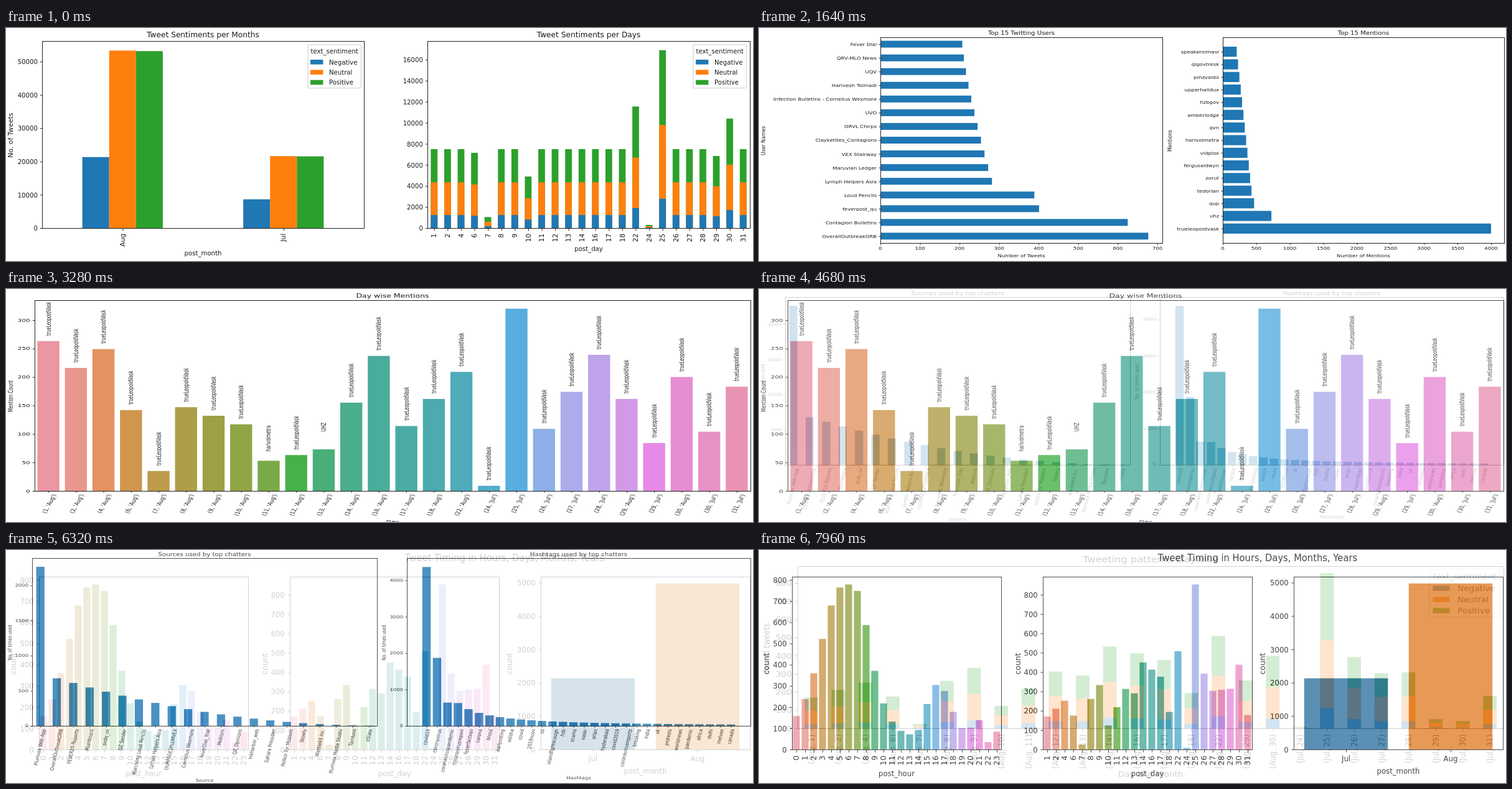
An HTML page that plays this animation: 1200 by 375 pixels, repeating every 8000 ms.

```html
<!DOCTYPE html>
<html lang="en">
<head>
<meta charset="utf-8">
<title>Chart slideshow</title>
<style>
html, body { margin: 0; width: 100%; height: 100%; overflow: hidden; background: #fff; }
svg { position: absolute; left: 0; top: 0; width: 1200px; height: 375px; background: #fff; }
text { font-family: 'DejaVu Sans', sans-serif; fill: #1c1c1c; white-space: pre; }
.line { fill: none; stroke: #222; stroke-width: 1; }

/* Each slide fades in over the one before, in five steps of 60 ms */
svg + svg { animation: 8s step-end infinite; }
#users { animation-name: users; }
#days { animation-name: days; }
#sources { animation-name: sources; }
#timing { animation-name: timing; }
#pattern { animation-name: pattern; }
@keyframes users { 0% { opacity: 0 } 17.5% { opacity: .2; animation-timing-function: steps(5, jump-none) } 21.25%, to { opacity: 1 } }
@keyframes days { 0% { opacity: 0 } 38% { opacity: .2; animation-timing-function: steps(5, jump-none) } 41.75%, to { opacity: 1 } }
@keyframes sources { 0% { opacity: 0 } 58.5% { opacity: .2; animation-timing-function: steps(5, jump-none) } 62.25%, to { opacity: 1 } }
@keyframes timing { 0% { opacity: 0 } 79% { opacity: .2; animation-timing-function: steps(5, jump-none) } 82.75%, to { opacity: 1 } }
@keyframes pattern { 0% { opacity: 0 } 99.5%, to { opacity: .2 } }
</style>
</head>
<body>
<svg id="sentiment" viewBox="0 0 1200 375"></svg>
<svg id="users" viewBox="0 0 1200 375"></svg>
<svg id="days" viewBox="0 0 1200 375"></svg>
<svg id="sources" viewBox="0 0 1200 375"></svg>
<svg id="timing" viewBox="0 0 1200 375"></svg>
<svg id="pattern" viewBox="0 0 1200 375"></svg>
<script>
const BLUE = '#1f77b4', ORANGE = '#ff7f0e', GREEN = '#2ca02c';
const STACK = [BLUE, ORANGE, GREEN];
let out, sx, sy;

// --- Data ---

const series = (n, f) => Array.from({ length: n }, (_, i) => f(i));

// Fills the holes of a list by straight lines between its neighbours
function fill(knots) {
  return series(knots.length, i => {
    let a = i, b = i;
    while (!(a in knots)) a--;
    while (!(b in knots)) b++;
    return a === b ? knots[i] : knots[a] + (knots[b] - knots[a]) * (i - a) / (b - a);
  });
}

// Lopsided peak with its own width on each side
const hill = (x, peak, height, left, right) =>
  height / (1 + (Math.abs(x - peak) / (x < peak ? left : right)) ** 3);

const skipped = [3, 5, 15, 19, 20, 21, 23];
const DAYS = series(31, i => i + 1).filter(d => !skipped.includes(d));

// All days have the same total but for a few
const unusual = { 6: 7150, 7: 1050, 10: 4900, 22: 11550, 24: 300, 25: 16900, 29: 6850, 30: 10400 };
const totals = DAYS.map(d => unusual[d] ?? 7500);

const tweets = fill([170, , 252, 175, 24, 261, 333, 124, , 313, 290, 450, , 376, 194, 508,
  8, 853, 392, 303, , 314, 438, 178]);

// Days 29 and 30 occur in both months; earlier ones are August, later ones July
const inAugust = d => ({ 29: .84, 30: .91 })[d] ?? +(d < 24);
const byMonth = (month, share) =>
  DAYS.map((day, i) => ({ day, month, n: tweets[i] * share(day) })).filter(e => e.n > 0);
const august = byMonth('Aug', inAugust), july = byMonth('Jul', d => 1 - inAugust(d));
const sum = list => list.reduce((total, e) => total + e.n, 0);

const mentions = fill([263, 216, 249, , 35, 147, , 117, 53, , 73, , 237, 114, , 209,
  9, 320, 109, , 239, , 84, 200, 104, 183]);

const hourly = series(24, h => hill(h, 6, 778, 3.8, 2.9) + hill(h, 16, 285, 1.25, 2.2) +
  hill(h, 21, 110, 1, .5) + hill(h, 23, 70, .4, .4));

// --- Drawing ---

function slide(id, scaleX, scaleY, draw) {
  out = ''; sx = scaleX; sy = scaleY;
  draw();
  document.getElementById(id).innerHTML = out;
}

const rect = (x, y, w, h, color) => {
  out += `<rect x="${x}" y="${y}" width="${w}" height="${h}" fill="${color}"/>`;
};
const line = (x, y, dx, dy) => {
  out += `<path class="line" d="M${x + .5} ${y + .5}l${dx} ${dy}"/>`;
};
const text = (x, y, s, { size = 10, anchor = 'middle', rot = 0, dy = 0 } = {}) => {
  out += `<text transform="translate(${x} ${y}) scale(${sx} ${sy}) rotate(${rot})" font-size="${size}" text-anchor="${anchor}" dy="${dy}em">${s}</text>`;
};

// Evenly spaced slots, with pad slots free at both ends
function slots(lo, hi, n, pad = 0) {
  const step = (hi - lo) / (n + 2 * pad);
  return { step, at: i => lo + (i + pad + .5) * step };
}

function frame([l, t, r, b], title, [xLabel, xBase], [yLabel, yBase]) {
  out += `<rect class="line" x="${l + .5}" y="${t + .5}" width="${r - l}" height="${b - t}"/>`;
  text((l + r) / 2, t - 5.3 * sy, title, { size: 12 });
  text((l + r) / 2, xBase, xLabel);
  text(yBase, (t + b) / 2 + 1, yLabel, { rot: -90 });
}

function yTicks([l, , , b], step, count, k) {
  for (let i = 0; i <= count; i++) {
    const y = b - i * step * k;
    line(l, y, -3.5 * sx, 0);
    text(l - 7 * sx, y + 3.8 * sy, i * step, { anchor: 'end' });
  }
}

function xTicks([l, , , b], step, count, k) {
  for (let i = 0; i <= count; i++) {
    const x = l + i * step * k;
    line(x, b, 0, 3.5 * sy);
    text(x, b + 14.8 * sy, i * step);
  }
}

function xNames([l, , r, b], names, rot, pad) {
  const s = slots(l, r, names.length, pad);
  names.forEach((name, i) => {
    const x = s.at(i);
    line(x, b, 0, 3.5 * sy);
    const lean = String(name).length * 2.6 * Math.cos(rot * Math.PI / 180) * sx;
    text(x + lean, b + 8 * sy, name, { anchor: 'end', rot: -rot, dy: .36 });
  });
}

function columns([l, , r, b], values, k, part, color, pad) {
  const s = slots(l, r, values.length, pad), w = s.step * part;
  values.forEach((v, i) => rect(s.at(i) - w / 2, b - v * k, w, v * k, color(i, values.length)));
}

function rows([l, t, , b], names, value, k, part, pad) {
  const s = slots(t, b, names.length, pad), h = s.step * part;
  names.forEach((name, i) => {
    const y = s.at(i);
    rect(l, y - h / 2, value(i) * k, h, BLUE);
    line(l, y, -3.5 * sx, 0);
    text(l - 7 * sx, y + 3.8 * sy, name, { anchor: 'end' });
  });
}

// Positive, neutral and negative levels as parts of each total
function stacked(box, values, k, neutral, negative) {
  [negative, neutral, 1].map((part, i) => [part, STACK[i]]).reverse().forEach(([part, color]) =>
    columns(box, values.map(v => v * part), k, .5, () => color));
}

function legend(x, y) {
  out += `<g transform="translate(${x} ${y}) scale(${sx} ${sy})">
    <rect width="84" height="64" rx="2" fill="#fff" fill-opacity=".8" stroke="#ccc"/>
    <text x="42" y="13.3" font-size="10" text-anchor="middle">text_sentiment</text>`;
  ['Negative', 'Neutral', 'Positive'].forEach((name, i) => {
    const c = 25.5 + i * 15;
    out += `<rect x="4" y="${c - 3.5}" width="20" height="7" fill="${STACK[i]}"/>
      <text x="33.5" y="${c + 3.6}" font-size="10">${name}</text>`;
  });
  out += '</g>';
}

// Evenly spaced hues at equal lightness (HSLuv), slightly muted
function hue(i, n) {
  const M = [[3.24097, -1.53738, -.49861], [-.96924, 1.87597, .04156], [.05563, -.20398, 1.05697]];
  const L = 69.3, a = (i / n + .01) * 359 * Math.PI / 180;
  const sub = (L + 16) ** 3 / 1560896;
  let chroma = Infinity;
  for (const [p, q, r] of M) for (const t of [0, 1]) {
    const d = (632260 * r - 126452 * q) * sub + 126452 * t;
    const slope = (284517 * p - 94839 * r) * sub / d;
    const icpt = ((838422 * r + 769860 * q + 731718 * p) * L * sub - 769860 * t * L) / d;
    const len = icpt / (Math.sin(a) - slope * Math.cos(a));
    if (len > 0) chroma = Math.min(chroma, len);
  }
  chroma *= .891;
  const u = Math.cos(a) * chroma / (13 * L) + .19783, v = Math.sin(a) * chroma / (13 * L) + .46832;
  const Y = ((L + 16) / 116) ** 3, X = 9 * Y * u / (4 * v), Z = (9 * Y - 15 * v * Y - v * X) / (3 * v);
  const rgb = M.map(([p, q, r]) => {
    const c = Math.max(0, p * X + q * Y + r * Z);
    return c <= .0031308 ? 12.92 * c : 1.055 * c ** (1 / 2.4) - .055;
  });
  const mid = (Math.max(...rgb) + Math.min(...rgb)) / 2;
  return `rgb(${rgb.map(c => Math.round(255 * (mid + (c - mid) * .75)))})`;
}

// --- Slides ---

slide('sentiment', 1.015, 1.09, () => {
  const left = [58, 21, 575, 322], right = [677, 21, 1195, 322], k = .00536;
  const month = slots(58, 575, 2), w = month.step / 6;
  [53300, 21600].forEach((top, m) => [.4, 1, .997].forEach((part, i) =>
    rect(month.at(m) + (i - 1.5) * w, 322 - top * part * k, w, top * part * k, STACK[i])));
  frame(left, 'Tweet Sentiments per Months', ['post_month', 366], ['No. of Tweets', 11]);
  yTicks(left, 10000, 5, k);
  xNames(left, ['Aug', 'Jul'], 90);
  legend(485, 27);

  stacked(right, totals, .01694, .58, .165);
  frame(right, 'Tweet Sentiments per Days', ['post_day', 359], ['', 0]);
  yTicks(right, 2000, 8, .01694);
  xNames(right, DAYS, 90);
  legend(1104, 27);
});

slide('users', .845, .775, () => {
  const left = [195, 15, 648, 346], right = [745, 15, 1197, 346];
  const leaders = [677, 625, 401, 389], mentioned = [4000, 725, 467];
  rows(left, ['Fever Dial', 'QRV-MLO News', 'UQV', 'Harivesh Tolmadi',
    'Infection Bulletins - Cornelius Wexmore', 'UVO', 'ORVL Chirps', 'Claykettles_Contagions',
    'VEX Stairway', 'Maruvian Ledger', 'Lymph Helpers Asia', 'Loud Pencils', 'feverpost_qu',
    'Contagion Bulletins', 'OverallOutbreakORB'],
    i => leaders[14 - i] ?? 207 + 75 * (i / 10) ** 1.3, .6357, .5);
  frame(left, 'Top 15 Twitting Users', ['Number of Tweets', 369], ['User Names', 10]);
  xTicks(left, 100, 7, .6357);

  rows(right, ['speakerolmavi', 'qlgovtresk', 'pmzvaldo', 'upperhalldux', 'hzbgov', 'amberlodge',
    'qvn', 'harivolmetra', 'vidplox', 'fergusaldwyn', 'zorut', 'tedorlan', 'qup', 'uhz', 'trueleopoldvask'],
    i => mentioned[14 - i] ?? 208 + 20 * i, .10775, .8, .64);
  frame(right, 'Top 15 Mentions', ['Number of Mentions', 369], ['Mentions', 663]);
  xTicks(right, 500, 8, .10775);
});

slide('days', 1.04, .7, () => {
  const box = [46, 18, 1196, 325], k = .9167;
  const dates = [...august, ...july].sort((a, b) => a.day - b.day);
  const special = { 8: 'harivolmetra', 10: 'UHZ', 17: '' };
  const s = slots(46, 1196, mentions.length);
  columns(box, mentions, k, .8, hue);
  mentions.forEach((v, i) =>
    text(s.at(i), 325 - v * k - 36, special[i] ?? 'trueLeopoldVask', { size: 9.3, rot: -90, dy: .36 }));
  frame(box, 'Day wise Mentions', ['Day', 377], ['Mention Count', 11]);
  yTicks(box, 50, 6, k);
  xNames(box, dates.map(e => `(${e.day}, '${e.month}')`), 70);
});

slide('sources', .85, .655, () => {
  const left = [42, 13, 596, 283], right = [644, 13, 1196, 283];
  const topTags = [4370, 1870, 640];
  columns(left, series(21, i => i ? 675 * (1 - (i - 1) / 19.5) ** 2 + 3 : 2265), .113, .5, () => BLUE);
  frame(left, 'Sources used by top chatters', ['Source', 373], ['No. of times used', 9]);
  yTicks(left, 500, 4, .113);
  xNames(left, ['Plumvex Web App', 'OverallOutbreakORB', 'FEVER20-Reports', 'Plumboard', 'sndq_ox',
    'QZ Sender', 'Marchling Loud Pencils', 'Lymph Helpers Asia', 'OURPAGE2PLUMVEX', 'Cornelius Wexmore',
    'feverDial_Trial', 'Moblorn', 'QZ_Opinions', 'InkHarbor_web', 'Sahara Pressden', 'Pelikor for Moblorn',
    'Stowly', 'Warblekit Inc.', 'Plumvex Media Studio', 'Tarnluvo', 'oSlate'], 80);

  columns(right, series(30, i => topTags[i] ?? 4370 / (i + 1) ** 1.4), .0585, .8, () => BLUE, 1.37);
  frame(right, 'Hashtags used by top chatters', ['Hashtags', 369], ['No. of times used', 610]);
  yTicks(right, 1000, 4, .0585);
  xNames(right, ('covid19 coronavirus coronaviruspandemic coronavirusreport feverfactsqo corona blood ' +
    'earlyvoting odisha covid 2019ncov us islandfightscough hzb scams vaskr orlan hyderabad covid2019 ' +
    'coronavirusreports breaking india uk protests worldnews pandemic africa delhi melvex canada').split(' '), 80, 1.37);
});

slide('timing', 1.17, 1.24, () => {
  const hours = [53, 43, 389, 321], days = [456, 43, 792, 321], months = [859, 43, 1195, 321];
  text(801, 17.5, 'Tweet Timing in Hours, Days, Months, Years', { size: 12.6 });
  columns(hours, hourly, .341, .8, hue);
  frame(hours, '', ['post_hour', 364], ['count', 16]);
  yTicks(hours, 100, 8, .341);
  xNames(hours, series(24, i => i), 90);

  columns(days, tweets, .3113, .8, hue);
  frame(days, '', ['post_day', 364], ['count', 420]);
  yTicks(days, 100, 8, .3113);
  xNames(days, DAYS, 90);

  const s = slots(859, 1195, 2);
  columns(months, [sum(july), sum(august)], .0537, .8, i => ['#3274a1', '#e1812c'][i]);
  frame(months, '', ['post_month', 360], ['count', 813]);
  yTicks(months, 1000, 5, .0537);
  ['Jul', 'Aug'].forEach((name, i) => {
    line(s.at(i), 321, 0, 4);
    text(s.at(i), 340, name);
  });
});

slide('pattern', 1.35, 1.2, () => {
  const box = [62, 26, 1196, 287], dates = [...august, ...july];
  stacked(box, dates.map(e => e.n), .2925, .57, .13);
  frame(box, 'Tweeting patterns Daywise', ['Day and month', 365], ['No. of tweets', 17]);
  yTicks(box, 100, 8, .2925);
  xNames(box, dates.map(e => `(${e.month}, ${e.day})`), 90);
  legend(1077, 31);
});
</script>
</body>
</html>
```
